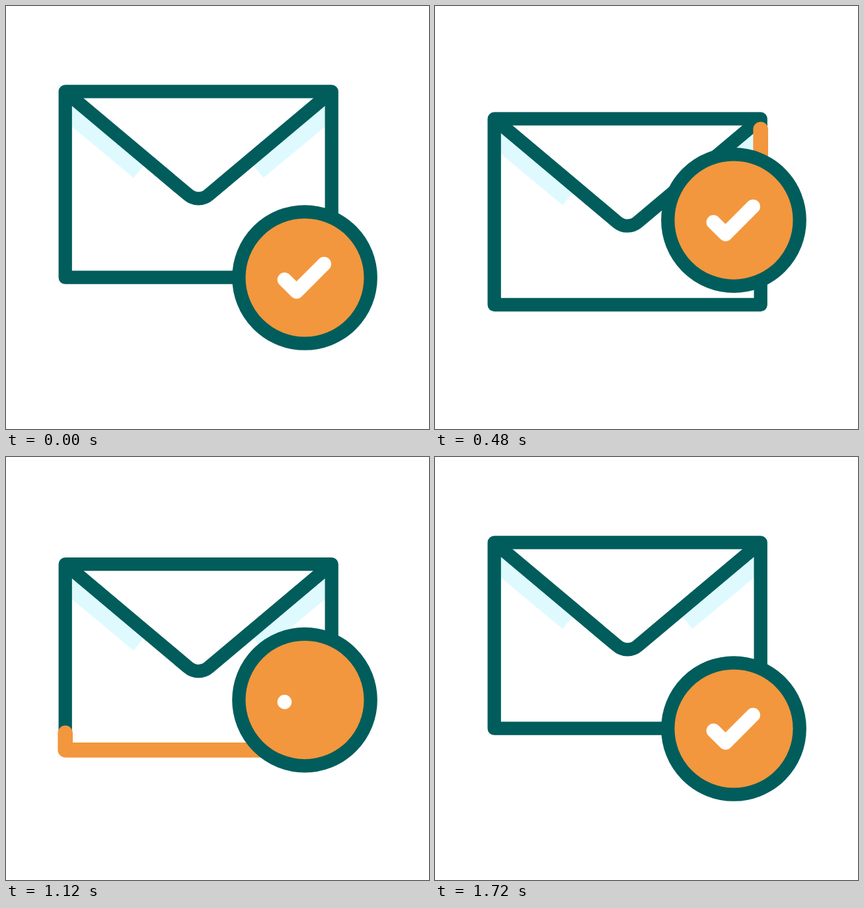
An HTML page for the animation above (2000 ms loop, 640 by 640 pixels).

```html
<!DOCTYPE html>
<html lang="en">
<head>
<meta charset="utf-8">
<title>Mail sent</title>
<style>
  html, body { margin: 0; height: 100%; overflow: hidden; background: #fff; }
  svg { display: block; width: 100vw; height: 100vh; }
  .line { fill: none; stroke: #005d5c; stroke-width: 20.3; stroke-linejoin: round; }
  .shade { fill: #defaff; }
  .snake { fill: none; stroke: #f2973d; stroke-width: 22.6; stroke-linecap: round; stroke-linejoin: round; }
  .disc { fill: #f2973d; stroke: #005d5c; stroke-width: 20.3; }
  .tick { fill: none; stroke: #fff; stroke-width: 21.6; stroke-linecap: round; stroke-linejoin: round; }
</style>
</head>
<body>
<svg viewBox="0 0 640 640">
  <defs>
    <clipPath id="hole"><circle cx="452" cy="411" r="89.6"/></clipPath>
    <path id="fold" d="M95 140V178.5L193 260L215 233Z"/>
  </defs>
  <g id="mail">
    <use class="shade" href="#fold"/>
    <use class="shade" href="#fold" transform="translate(582.4 0) scale(-1 1)"/>
    <path class="line" d="M89.7 129.4H492.7V410.7H89.7Z"/>
    <path class="line" d="M89.7 129.4L275.6 285.6A24 24 0 0 0 306.8 285.6L492.7 129.4"/>
    <path class="snake" id="snake" pathLength="1" visibility="hidden" d="M492.7 330V129.4H89.7V410.7H387"/>
  </g>
  <g id="badge">
    <circle class="disc" cx="452" cy="411" r="99.7"/>
    <g clip-path="url(#hole)">
      <path class="tick" id="tick" pathLength="1" d="M421.4 414L439.6 432L481.2 390.4"/>
    </g>
  </g>
</svg>
<script>
  const LOOP = 2000, STEP = 40;
  const [mail, badge, snake, tick] =
    ['mail', 'badge', 'snake', 'tick'].map(id => document.getElementById(id));

  // Cubic bezier (p, 0, q, 1), solved by bisection.
  const bezier = (p, q) => x => {
    if (x <= 0) return 0;
    if (x >= 1) return 1;
    let lo = 0, hi = 1, s;
    for (let i = 0; i < 24; i++) {
      s = (lo + hi) / 2;
      const at = 3 * p * s * (1 - s) ** 2 + 3 * q * s * s * (1 - s) + s ** 3;
      if (at < x) lo = s; else hi = s;
    }
    return s * s * (3 - 2 * s);
  };
  const heavy = bezier(0.56, 0.3);
  const quick = bezier(0.48, 0.21);
  const even = bezier(1 / 3, 2 / 3);

  const tween = (ease, t, from, to) => ease((t - from) / (to - from));
  const shift = (el, y) => el.setAttribute('transform', `translate(0 ${y.toFixed(2)})`);

  function trim(el, from, to) {
    const len = to - from;
    el.setAttribute('stroke-dasharray', `${Math.max(len, 0.0001)} 2`);
    el.setAttribute('stroke-dashoffset', -from);
  }

  function draw(t) {
    shift(mail, 52 * (tween(heavy, t, 80, 760) - tween(heavy, t, 800, 1600)));
    shift(badge, -95 * (tween(quick, t, 80, 680) - tween(quick, t, 800, 1600)));

    const head = tween(even, t, 320, 960);
    const tail = tween(even, t, 700, 1340);
    snake.setAttribute('visibility', head > tail ? 'visible' : 'hidden');
    trim(snake, tail, head);

    // The tick drops out of the disc, then is drawn anew.
    const falling = t > 800 && t < 1110;
    shift(tick, falling ? 140 * ((t - 800) / 312) ** 2 : 0);
    trim(tick, 0, t < 1110 ? 1 : tween(quick, t, 1110, 1720));
  }

  function tickClock() {
    const t = performance.now() % LOOP;
    draw(Math.floor(t / STEP) * STEP);
    requestAnimationFrame(tickClock);
  }
  draw(0);
  requestAnimationFrame(tickClock);
</script>
</body>
</html>
```
